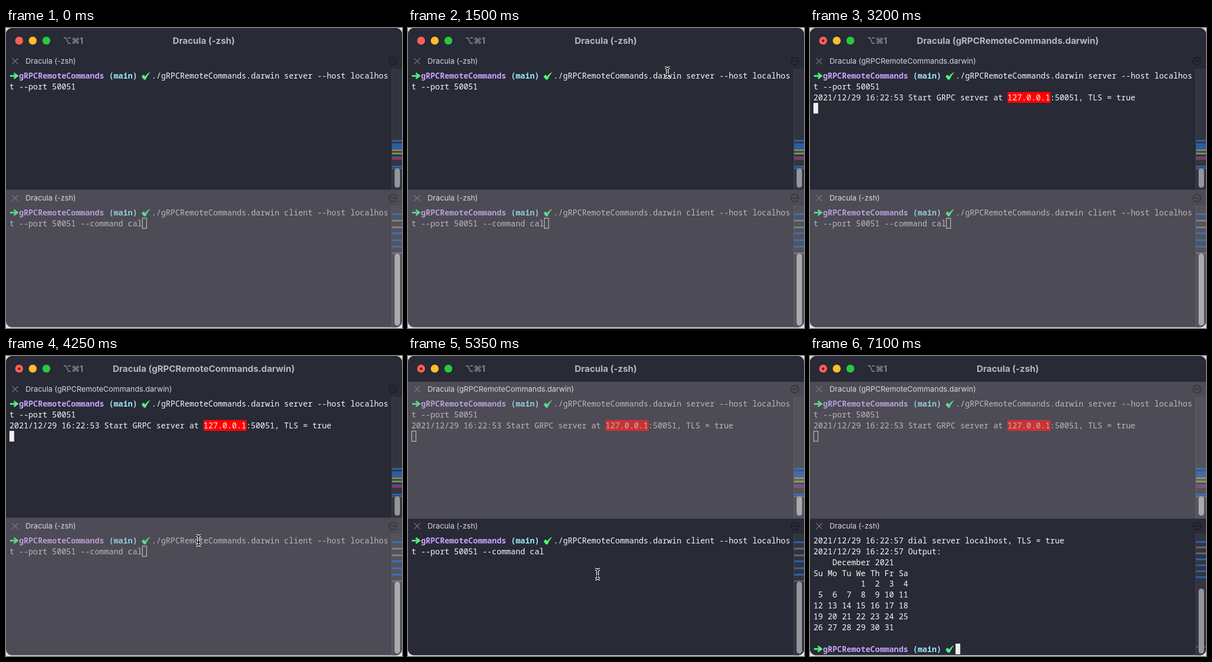
An HTML page with a canvas that plays this animation: 800x605 px, repeating every 8 s.

```html
<!DOCTYPE html>
<html lang="en">
<head>
<meta charset="utf-8">
<title>Terminal</title>
<style>
  html, body { margin: 0; height: 100%; overflow: hidden; background: #e4e4e8; }
  canvas { display: block; }
</style>
</head>
<body>
<canvas id="stage" width="800" height="605"></canvas>
<script>
const ctx = document.getElementById('stage').getContext('2d');
const LOOP = 8000, CELL = 9.57, ROW = 21.85, LEFT = 7;
const MONO = '15.95px "Noto Sans Mono", monospace';
const UI = 'Inter, sans-serif';

const ACTIVE = {
  bg: '#282a36', text: '#f8f8f4', purple: '#c7a4fa', cyan: '#9aeafb', green: '#50fa7b',
  red: '#ff0000', icon: '#14151b', gutter: '#32343f', edge: '#444650', thumb: '#95959a',
  blue: '#2c62ab', grey: '#65666d', olive: '#82875a', mark: '#b02a2c'
};
const DIM = {
  bg: '#4d4b55', text: '#bab8bb', purple: '#b39fd2', cyan: '#93cbd7', green: '#5fd68b',
  red: '#cb3235', icon: '#29292f', gutter: '#54535b', edge: '#66656d', thumb: '#aaa9ad',
  blue: '#3b70bb', grey: '#807f85', olive: '#969363', mark: '#c53b3c'
};

const PROGRAM = 'gRPCRemoteCommands.darwin';
const SHELL_TITLE = 'Dracula (-zsh)', SERVER_TITLE = `Dracula (${PROGRAM})`;
const OUTPUT = [
  '2021/12/29 16:22:57 dial server localhost, TLS = true',
  '2021/12/29 16:22:57 Output:',
  '    December 2021',
  'Su Mo Tu We Th Fr Sa'
];
for (let sunday = -2; sunday <= 26; sunday += 7) {
  const week = Array.from({ length: 7 }, (_, i) => sunday + i);
  OUTPUT.push(week.map(d => (d > 0 && d < 32 ? String(d) : '').padStart(2)).join(' '));
}

// Event times in ms
const SERVER_ENTER = 1900, SERVER_UP = 2100, RENAMED = 3100, SWITCH = 4350;
const CLIENT_ENTER = 6850, DIALED = 6950, PRINTED = 7050, DONE = 7100;

const MOVES = [
  { from: 50, to: 850, path: [[490, 190], [524, 90]] },
  { from: 3700, to: 4200, path: [[524, 90], [389, 372]] },
  { from: 4450, to: 4850, path: [[389, 372], [383, 440]] }
];

function rect(x, y, w, h, color) {
  ctx.fillStyle = color;
  ctx.fillRect(x, y, w, h);
}

function disc(x, y, r, color) {
  ctx.fillStyle = color;
  ctx.beginPath();
  ctx.arc(x, y, r, 0, 7);
  ctx.fill();
}

function stroke(path, color, width) {
  ctx.strokeStyle = color;
  ctx.lineWidth = width;
  ctx.stroke(new Path2D(path));
}

function label(text, x, y, font, color, align = 'left') {
  ctx.font = font;
  ctx.fillStyle = color;
  ctx.textAlign = align;
  ctx.fillText(text, x, y);
}

const colX = col => LEFT + col * CELL;

function type(text, col, row, top, color, bold = false) {
  label(text, colX(col), top + row * ROW + 16.7, (bold ? 'bold ' : '') + MONO, color);
}

function prompt(row, top, pal) {
  ctx.save();
  ctx.translate(0, top + row * ROW + 11);
  stroke('M8 0H22M16 -5.5L23 0L16 5.5', pal.green, 3.2);
  ctx.fillStyle = pal.green;
  ctx.fill(new Path2D('M274 1.5Q276 -2 279 -2L281 1.5Q285 -5 291.5 -7.5Q285.5 -1 282 7.5H278.5Z'));
  ctx.restore();
  type('gRPCRemoteCommands', 2, row, top, pal.purple, true);
  type('(main)', 21, row, top, pal.cyan, true);
}

function command(mode, rest, top, pal) {
  prompt(0, top, pal);
  type(`./${PROGRAM} ${mode} --host localhos`, 30, 0, top, pal.text);
  type(rest, 0, 1, top, pal.text);
}

function caret(col, row, top, pal) {
  const x = Math.round(colX(col)), y = Math.round(top + row * ROW);
  if (pal === ACTIVE) return rect(x, y, 9.5, 21.5, '#f0f0ee');
  ctx.strokeStyle = '#d0ced1';
  ctx.lineWidth = 1.2;
  ctx.strokeRect(x + .5, y + .5, 8.5, 20.5);
}

function pane(y, height, title, pal) {
  rect(0, y, 800, height, pal.bg);
  rect(779, y + 30, 21, height - 30, pal.gutter);
  rect(779, y + 30, 1, height - 30, pal.edge);
  stroke(`M12.5 ${y + 9}l12 12m0 -12l-12 12`, '#7c7c83', 1.2);
  label(title, 39.5, y + 20.3, '15px ' + UI, '#d8d8db');
  ctx.strokeStyle = pal.icon;
  ctx.lineWidth = 1.3;
  ctx.beginPath();
  ctx.arc(781.5, y + 15, 7.6, 0, 7);
  ctx.stroke();
  for (const dx of [-3.5, 0, 3.5]) disc(781.5 + dx, y + 15, 1.2, pal.icon);
}

function marks(ys, color, h = 3.5) {
  for (const y of ys) rect(780, y - h / 2, 20, h, color);
}

function thumb(y, h, color) {
  ctx.fillStyle = color;
  ctx.beginPath();
  ctx.roundRect(785, y, 11, h, 5.5);
  ctx.fill();
}

function serverPane(t) {
  const pal = t < SWITCH ? ACTIVE : DIM, top = 85.6;
  pane(52, 276, t < RENAMED ? SHELL_TITLE : SERVER_TITLE, pal);
  marks([227.5, 234.5, 238.5, 242, 261, 279.5], pal.blue, 3.5);
  marks([246.5, 253], pal.olive, 4);
  marks([264.5], pal.mark, 3);
  marks([283.5], pal.grey, 2);
  thumb(283, 39, pal.thumb);

  command('server', 't --port 50051', top, pal);
  if (t >= SERVER_UP) {
    rect(399, 129, 87, 22, pal.red);
    type('2021/12/29 16:22:53 Start GRPC server at 127.0.0.1:50051, TLS = true', 0, 2, top, pal.text);
  }
  if (t < SERVER_ENTER) {
    if ((t >= 50 && t < 550) || (t >= 1100 && t < 1500)) caret(14, 1, top, pal);
  } else if (t < SERVER_UP) {
    caret(0, 2, top, pal);
  } else if (t >= SWITCH || !((t >= 2600 && t < 3100) || (t >= 3700 && t < 4200))) {
    caret(0, 3, top, pal);
  }
}

function clientPane(t) {
  const pal = t < SWITCH ? DIM : ACTIVE, top = 361.3;
  if (t < SWITCH) rect(0, 326, 800, 2, pal.bg);
  pane(328, 277, SHELL_TITLE, pal);

  if (t < PRINTED) {
    marks([375.5, 414, 428, 441], pal.blue);
    marks([388.5, 402], pal.grey);
    marks([454], pal.grey, 2.5);
    thumb(455, 145, pal.thumb);
    command('client', 't --port 50051 --command cal', top, pal);
  } else {
    marks([375, 410, 422, 434, 446], pal.blue);
    marks([386, 398], pal.grey);
    marks([586.5], pal.grey, 2);
    thumb(469, 131, pal.thumb);
    OUTPUT.forEach((line, row) => type(line, 0, row, top, pal.text));
  }

  if (t < SWITCH) caret(28, 1, top, pal);
  else if (t < CLIENT_ENTER) {
    if ((t >= 4600 && t < 5150) || (t >= 5700 && t < 6200)) caret(28, 1, top, pal);
  } else if (t < DIALED) caret(0, 2, top, pal);
  else if (t < PRINTED) {
    type(OUTPUT[0], 0, 2, top, pal.text);
    caret(0, 3, top, pal);
  } else if (t < DONE) caret(0, 10, top, pal);
  else {
    prompt(10, top, pal);
    caret(30, 10, top, pal);
  }
}

function titleBar(t) {
  rect(0, 0, 800, 52, '#282a35');
  ['#ff5f57', '#febc2e', '#28c840'].forEach((color, i) => disc(26.5 + i * 27.5, 25.5, 8, color));
  if (t >= RENAMED) disc(26.5, 25.5, 2.6, '#7c1712');
  label('⌥⌘1', 115, 32, 'bold 17px Inter, "DejaVu Sans", sans-serif', '#84858b');
  const title = t >= RENAMED && t < SWITCH ? SERVER_TITLE : SHELL_TITLE;
  label(title, 399.5, 32, 'bold 18px ' + UI, '#b8b8bc', 'center');
}

function pointer(t) {
  const hidden = t < 50 || (t >= SERVER_ENTER && t < 3700) || t >= CLIENT_ENTER;
  if (hidden) return;
  const { from, to, path: [a, b] } = MOVES.findLast(m => t >= m.from);
  const p = Math.min(1, (t - from) / (to - from)), ease = p * p * (3 - 2 * p);
  const beam = 'M-5 -10Q0 -10 0 -6V6Q0 10 -5 10M5 -10Q0 -10 0 -6M0 6Q0 10 5 10M-3 3.5H3';
  const dark = t >= 6700;
  ctx.save();
  ctx.translate(a[0] + (b[0] - a[0]) * ease, a[1] + (b[1] - a[1]) * ease);
  stroke(beam, dark ? '#65666d' : '#f8f8f8', 4.8);
  stroke(beam, '#0c0d11', dark ? 3.2 : 1.8);
  ctx.restore();
}

function draw(t) {
  ctx.clearRect(0, 0, 800, 605);
  ctx.save();
  ctx.beginPath();
  ctx.roundRect(0, 0, 800, 603.6, 12);
  ctx.clip();
  titleBar(t);
  serverPane(t);
  clientPane(t);
  ctx.restore();
  pointer(t);
}

let start;
function tick(now) {
  start ??= now;
  draw((now - start) % LOOP);
  requestAnimationFrame(tick);
}
requestAnimationFrame(tick);
</script>
</body>
</html>
```
